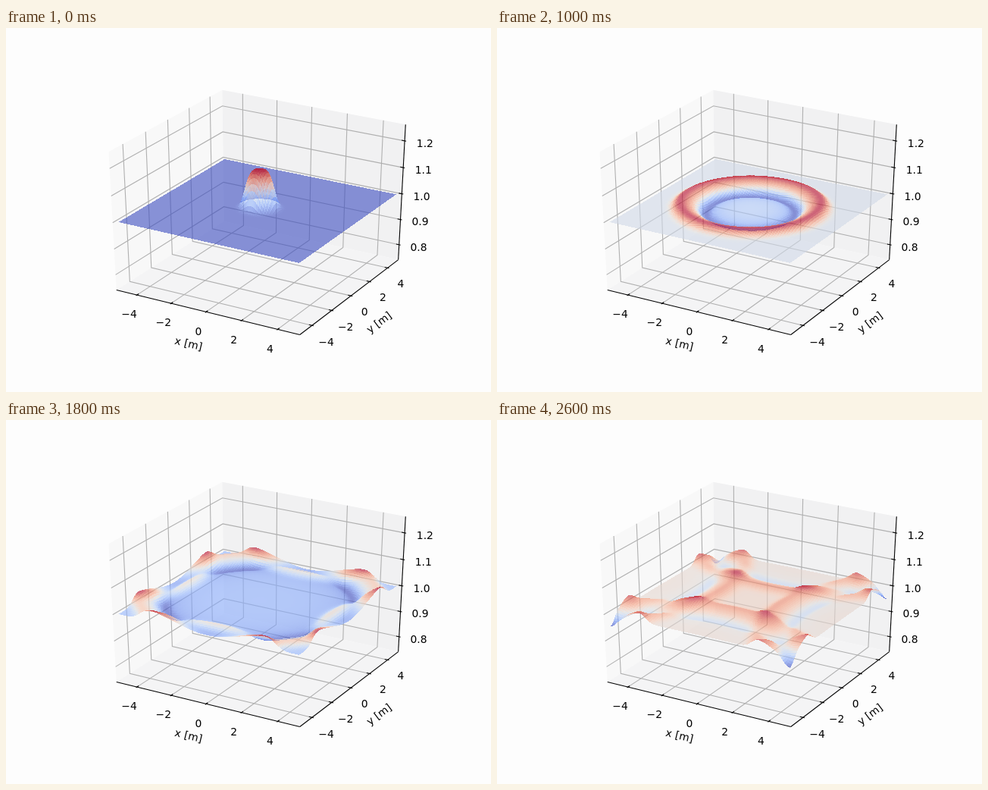
An HTML page with a canvas for the animation above (2.8 s loop, 640 by 480 pixels).

```html
<!DOCTYPE html>
<html lang="en">
<head>
<meta charset="utf-8">
<title>Water wave in a square basin</title>
<style>
  html, body { margin: 0; width: 100%; height: 100%; overflow: hidden; background: #fdfdfd; }
  canvas { display: block; }
</style>
</head>
<body>
<canvas id="stage" width="640" height="480"></canvas>
<script>
const W = 640, H = 480;
const ctx = document.getElementById('stage').getContext('2d');

// Perspective view of the cube [-0.5, 0.5]^3 (azimuth -60, elevation 30)
const C = Math.sqrt(3) / 2;
function project(x, y, z) {
  const right = C * x + 0.5 * y;
  const up = -0.25 * x + C / 2 * y + C * z;
  const depth = 10 - (C / 2 * x - 0.75 * y + 0.5 * z);
  return [334.7 + 2681 * right / depth, 237.4 - 1998 * up / depth];
}

// Axes
const B = 25 / 48;
function path(points) {
  ctx.beginPath();
  points.forEach(p => ctx.lineTo(...project(...p)));
}
function line(color, ...points) {
  path(points);
  ctx.strokeStyle = color;
  ctx.stroke();
}
function pane(color, ...points) {
  path(points);
  ctx.fillStyle = color;
  ctx.fill();
}
function label(text, x, y, angle = 0) {
  ctx.save();
  ctx.translate(x, y);
  ctx.rotate(angle * Math.PI / 180);
  ctx.fillText(text, 0, 5);
  ctx.restore();
}
function tickLabel(text, point, dx, dy) {
  const [x, y] = project(...point);
  label(text, x + dx, y + dy);
}

function drawAxes() {
  const grid = '#b0b0b0', ink = '#000', tickOut = B + 1 / 120, tickIn = B - 1 / 60;
  const far = 0.616, farZ = 0.595;
  ctx.fillStyle = '#fdfdfd';
  ctx.fillRect(0, 0, W, H);
  ctx.lineWidth = 1.11;
  pane('#f8f8f8', [-B, -B, -B], [-B, B, -B], [-B, B, B], [-B, -B, B]);
  pane('#f1f1f2', [-B, B, -B], [B, B, -B], [B, B, B], [-B, B, B]);
  pane('#f4f4f5', [-B, -B, -B], [B, -B, -B], [B, B, -B], [-B, B, -B]);

  const ticks = [-4, -2, 0, 2, 4];
  for (const n of ticks) {
    const p = n / 10;
    line(grid, [p, -B, -B], [p, B, -B], [p, B, B]);
    line(grid, [B, p, -B], [-B, p, -B], [-B, p, B]);
    line(grid, [-B, -B, p], [-B, B, p], [B, B, p]);
  }
  line(ink, [-B, -B, -B], [B, -B, -B]);
  line(ink, [B, -B, -B], [B, B, -B]);
  line(ink, [B, B, -B], [B, B, B]);

  ctx.font = '13.89px "DejaVu Sans", sans-serif';
  ctx.textAlign = 'center';
  for (const n of ticks) {
    const p = n / 10, text = String(n).replace('-', '\u2212');
    line(ink, [p, -tickIn, -B], [p, -tickOut, -B]);
    line(ink, [tickIn, p, -B], [tickOut, p, -B]);
    line(ink, [tickIn, B, p], [tickOut, B, p]);
    ctx.fillStyle = ink;
    tickLabel(text, [p, -far, -far], 3, 0);
    tickLabel(text, [far, p, -far], -4, 0);
    tickLabel((1 + p / 2).toFixed(1), [farZ, farZ, p], 0, 5.5);
  }
  label('x [m]', 241, 416, 13.5);
  label('y [m]', 492, 388, -37);
}

// Wave equation on a 10 m square with reflecting walls, solved by leapfrog
const N = 100, ROW = N + 1, STEP = 10 / N;
const FRAMES = 14, FRAME_MS = 200, SUBSTEPS = 10, TRAVEL = 0.61;

function simulate() {
  let now = new Float64Array(ROW * ROW);
  for (let j = 0; j <= N; j++)
    for (let i = 0; i <= N; i++) {
      const r = Math.hypot(i * STEP - 5, j * STEP - 5);
      now[j * ROW + i] = 0.145 * Math.exp(-((r / 0.8) ** 4));
    }
  let before = null;
  const k = (TRAVEL / SUBSTEPS / STEP) ** 2;
  const mirror = i => i < 0 ? 1 : i > N ? N - 1 : i;
  const frames = [now];
  for (let s = 1; s < FRAMES * SUBSTEPS; s++) {
    const next = new Float64Array(ROW * ROW);
    for (let j = 0; j <= N; j++)
      for (let i = 0; i <= N; i++) {
        const c = j * ROW + i;
        const force = k * (now[j * ROW + mirror(i - 1)] + now[j * ROW + mirror(i + 1)] +
          now[mirror(j - 1) * ROW + i] + now[mirror(j + 1) * ROW + i] - 4 * now[c]);
        next[c] = before ? 2 * now[c] - before[c] + force : now[c] + force / 2;
      }
    before = now;
    now = next;
    if (s % SUBSTEPS === 0) frames.push(now);
  }
  return frames;
}

// Diverging blue-red colour scale
const SCALE = [[59, 76, 192], [98, 130, 234], [141, 176, 254], [184, 208, 249], [221, 221, 221],
  [245, 196, 173], [244, 154, 123], [222, 96, 77], [180, 4, 38]];
function colorAt(t) {
  const p = t * 8, i = Math.min(7, Math.floor(p));
  return SCALE[i].map((v, ch) => v + (SCALE[i + 1][ch] - v) * (p - i));
}

// Blend a quad into the pixels; neighbours share edges without seams
const ALPHA = 0.6;
function fillQuad(data, quad, color) {
  const ys = quad.map(p => p[1]);
  const bottom = Math.ceil(Math.max(...ys) - 0.5);
  for (let y = Math.ceil(Math.min(...ys) - 0.5); y < bottom; y++) {
    const mid = y + 0.5;
    let left = Infinity, right = -Infinity;
    for (let e = 0; e < 4; e++) {
      const a = quad[e], b = quad[(e + 1) % 4];
      if ((a[1] <= mid) === (b[1] <= mid)) continue;
      const x = a[0] + (b[0] - a[0]) * (mid - a[1]) / (b[1] - a[1]);
      left = Math.min(left, x);
      right = Math.max(right, x);
    }
    const end = Math.ceil(right - 0.5);
    for (let x = Math.ceil(left - 0.5); x < end; x++) {
      const o = (y * W + x) * 4;
      for (let ch = 0; ch < 3; ch++) data[o + ch] += ALPHA * (color[ch] - data[o + ch]);
    }
  }
}

function drawSurface(heights) {
  const image = new ImageData(new Uint8ClampedArray(backdrop.data), W, H);
  const points = Array.from(heights, (h, c) =>
    project((c % ROW) / N - 0.5, Math.floor(c / ROW) / N - 0.5, h * 2));
  const cells = [];
  let low = Infinity, high = -Infinity;
  for (let j = N - 1; j >= 0; j--)       // far to near
    for (let i = 0; i < N; i++) {
      const c = j * ROW + i, corners = [c, c + 1, c + ROW + 1, c + ROW];
      const mean = corners.reduce((sum, n) => sum + heights[n], 0) / 4;
      low = Math.min(low, mean);
      high = Math.max(high, mean);
      cells.push({ corners, mean });
    }
  for (const { corners, mean } of cells)
    fillQuad(image.data, corners.map(n => points[n]), colorAt((mean - low) / (high - low)));
  ctx.putImageData(image, 0, 0);
}

drawAxes();
const backdrop = ctx.getImageData(0, 0, W, H);
const frames = simulate();
const start = performance.now();
let shown = -1;

function tick() {
  const frame = Math.floor((performance.now() - start) / FRAME_MS) % FRAMES;
  if (frame !== shown) drawSurface(frames[shown = frame]);
  requestAnimationFrame(tick);
}
tick();
</script>
</body>
</html>
```
